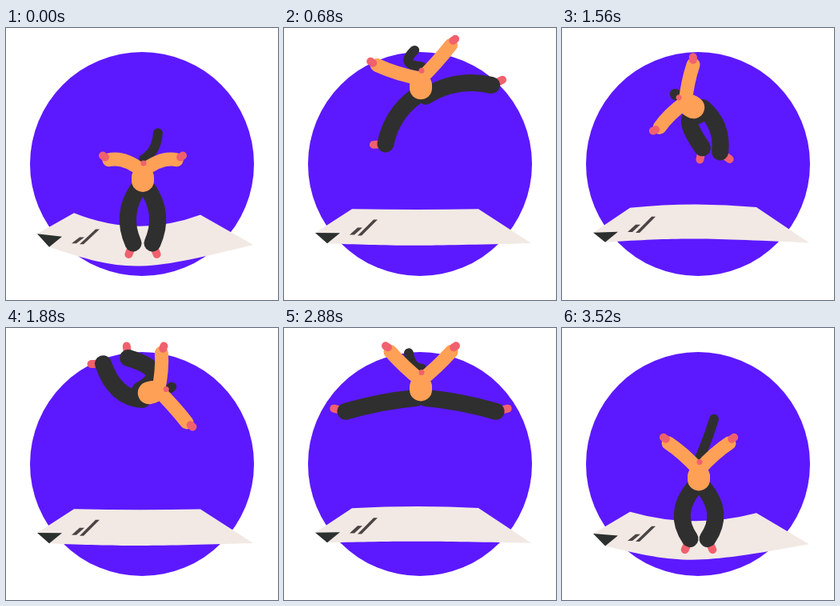
These frames come from a looping animation (340 px wide and 340 px high, 3.56 s). An HTML page with a canvas:

```html
<!DOCTYPE html>
<html lang="en">
<head>
<meta charset="utf-8">
<title>Trampoline</title>
<style>
html, body { margin: 0; width: 100%; height: 100%; overflow: hidden; background: #fff; }
canvas { display: block; width: 340px; height: 340px; }
</style>
</head>
<body>
<canvas id="stage" width="340" height="340"></canvas>
<script>
const ctx = document.getElementById('stage').getContext('2d');
const LOOP = 3560;
const BOTTOMS = [45, 1220, 2440, 3605];
const PURPLE = '#5c19ff', BLACK = '#2f2f2f', ORANGE = '#ffa057', CORAL = '#f0616d', PAPER = '#f2e9e4';

// One body side: hand x, y, arm bend, knee x, y, ankle x, y, foot angle (x grows outwards)
const side = {
  land: [38, -60, 3, 37, 40, 11, 71, 28],
  sink: [43, -52, 8, 33, 42, 11, 74, 25],
  squash: [49, -31, 15, 28, 42, 12, 78, 22],
  rise: [43, 30, 24, 21, 46, 11, 82, 10],
  stretch: [48, -8, 12, 14, 44, 12, 82, 12],
  fall: [36, -59, 3, 18, 44, 13, 80, 20],
  split: [43, -54, 1, 50, 14, 94, 27, 104],
  strideLeft: [61, -33, 1, 36, 33, 43, 70, 84],
  strideRight: [42, -60, 1, 44, -12, 86, -1, 113],
  tuckLeft: [51, -32, 8, 18, -37, 49, 14, 98],
  tuckRight: [54, -41, 6, -5, 43, -50, 46, -14]
};
// Ponytail: control point and tip
const hair = {
  up: [10, -54, 19, -82],
  sink: [11, -50, 19, -76],
  squash: [17, -36, 19, -60],
  flop: [9, -39, 12, -18],
  down: [9, -38, 11, -12],
  curl: [-26, -30, -7, -48],
  swing: [-12, -27, -15, -46],
  bun: [0, -30, 0, -29]
};
const pose = (left, tail, right = left) => [...side[left], ...side[right], ...hair[tail]];
const tricks = [
  [[640, pose('strideLeft', 'curl', 'strideRight')], [700, pose('strideLeft', 'curl', 'strideRight')]],
  [[1660, pose('tuckLeft', 'bun', 'tuckRight')], [1880, pose('tuckLeft', 'bun', 'tuckRight')]],
  [[2880, pose('split', 'swing')], [3080, pose('split', 'curl')]]
];
const keys = tricks.flatMap((trick, i) => {
  const start = BOTTOMS[i], end = BOTTOMS[i + 1];
  return [
    [start - 45, pose('squash', 'squash')],
    [start + 58, pose('rise', 'flop')],
    [start + 170, pose('stretch', 'down')],
    ...trick,
    [end - 250, pose('fall', 'up')],
    [end - 123, pose('land', 'up')],
    [end - 85, pose('sink', 'sink')]
  ];
});

function keyAt(i) {
  const n = keys.length, turn = Math.floor(i / n);
  const [time, values] = keys[i - turn * n];
  return [time + turn * LOOP, values];
}

// Smooth curve through the key poses
function poseAt(t) {
  let i = keys.length - 1;
  while (keys[i][0] > t) i--;
  const [[t0, a], [t1, b], [t2, c], [t3, d]] = [-1, 0, 1, 2].map(k => keyAt(i + k));
  const span = t2 - t1, x = (t - t1) / span, y = 1 - x;
  return b.map((from, k) => {
    const m1 = (c[k] - a[k]) / (t2 - t0) * span;
    const m2 = (d[k] - b[k]) / (t3 - t1) * span;
    return y * y * (1 + 2 * x) * from + x * x * (3 - 2 * x) * c[k] + x * y * (y * m1 - x * m2);
  });
}

function pelvisHeight(t) {
  const i = BOTTOMS.findIndex(b => t < b + 60);
  const before = BOTTOMS[i] - t;
  if (before < 130) return 186 + 5 * Math.sin(Math.PI * (130 - before) / 190);
  const takeoff = BOTTOMS[i - 1] + 60, half = (BOTTOMS[i] - 130 - takeoff) / 2;
  return 72 + 114 * ((t - takeoff) / half - 1) ** 2;
}

function matDip(t) {
  const nearest = BOTTOMS.reduce((p, b) => Math.abs(t - b) < Math.abs(t - p) ? b : p);
  const press = 30 - 0.00154 * (t - nearest) ** 2;
  if (press > 0) return press;
  const free = t - BOTTOMS.filter(b => b < t).pop() - 140;
  return -14 * Math.exp(-0.0035 * free) * Math.sin(Math.PI * free / 420);
}

function flipAngle(t) {
  const x = Math.min(1, Math.max(0, (t - 1380) / 710));
  return -2 * Math.PI * x * x * (3 - 2 * x);
}

function fill(color, build) {
  ctx.fillStyle = color;
  ctx.beginPath();
  build();
  ctx.fill();
}

function polygon(color, points) {
  fill(color, () => points.forEach(p => ctx.lineTo(...p)));
}

function disc(color, x, y, r) {
  fill(color, () => ctx.arc(x, y, r, 0, 7));
}

function limb(color, width, x0, y0, cx, cy, x1, y1) {
  ctx.strokeStyle = color;
  ctx.lineWidth = width;
  ctx.beginPath();
  ctx.moveTo(x0, y0);
  ctx.quadraticCurveTo(cx, cy, x1, y1);
  ctx.stroke();
}

function drawMat(d) {
  const backLeft = 226 + 0.19 * d, backRight = 226 + 0.28 * d;
  const frontLeft = 269 + 0.18 * d, tip = 269 + 0.07 * d, corner = 256 + 0.05 * d;
  const backSag = 2 * (226 + 0.8 * d) - (backLeft + backRight) / 2;
  const frontSag = (4 * (270.5 + d) - (frontLeft + tip) / 2) / 3;
  fill(PAPER, () => {
    ctx.moveTo(39, corner);
    ctx.lineTo(85, backLeft);
    ctx.quadraticCurveTo(164, backSag, 243, backRight);
    ctx.lineTo(309, tip);
    ctx.bezierCurveTo(168, frontSag, 150, frontSag, 54, frontLeft);
  });
  polygon('#2b302f', [[39, corner], [70, 256 + 0.18 * d], [54, frontLeft]]);
  const low = 0.42 * d, high = 0.46 * d;
  polygon('#4b4444', [[82, 258 + low], [88, 258 + low], [98, 249 + high], [92, 249 + high]]);
  polygon('#4b4444', [[92, 259 + low], [97, 259 + low], [117, 239 + high], [112, 239 + high]]);
}

function drawLeg(dir, [, , , kx, ky, ax, ay, foot]) {
  const angle = foot * Math.PI / 180, x = dir * ax;
  const toeX = x + dir * 15 * Math.sin(angle), toeY = ay + 15 * Math.cos(angle);
  limb(CORAL, 10, x, ay, x, ay, toeX, toeY);
  limb(BLACK, 21, dir * 6, 10, dir * kx, ky, x, ay);
}

function drawArm(dir, [hx, hy, bend]) {
  const reach = Math.hypot(hx, hy), inner = 1 - 8 / reach;
  limb(ORANGE, 17, 0, -12, dir * hx * 0.47, hy * 0.5 - bend, dir * hx * inner, hy * inner);
  limb(CORAL, 10, dir * (hx - 2), hy + 1, dir * hx, hy, dir * (hx + 1), hy - 1);
}

function drawJumper(t) {
  const p = poseAt(t), left = p.slice(0, 8), right = p.slice(8, 16);
  ctx.save();
  ctx.translate(171, pelvisHeight(t) + 8);
  ctx.rotate(flipAngle(t));
  ctx.translate(0, -8);
  limb(BLACK, 12, 1, -27, ...p.slice(16));
  drawLeg(-1, left);
  drawLeg(1, right);
  limb(ORANGE, 28, 0, -4, 0, -2, 0, 0);
  drawArm(-1, left);
  drawArm(1, right);
  disc(CORAL, 1, -22, 3.5);
  ctx.restore();
}

function draw(now) {
  const t = now % LOOP;
  ctx.clearRect(0, 0, 340, 340);
  ctx.lineCap = 'round';
  disc(PURPLE, 170, 170, 140);
  drawMat(matDip(t));
  drawJumper(t);
}

const start = performance.now();
function tick() {
  draw(performance.now() - start);
  requestAnimationFrame(tick);
}
tick();
</script>
</body>
</html>
```
